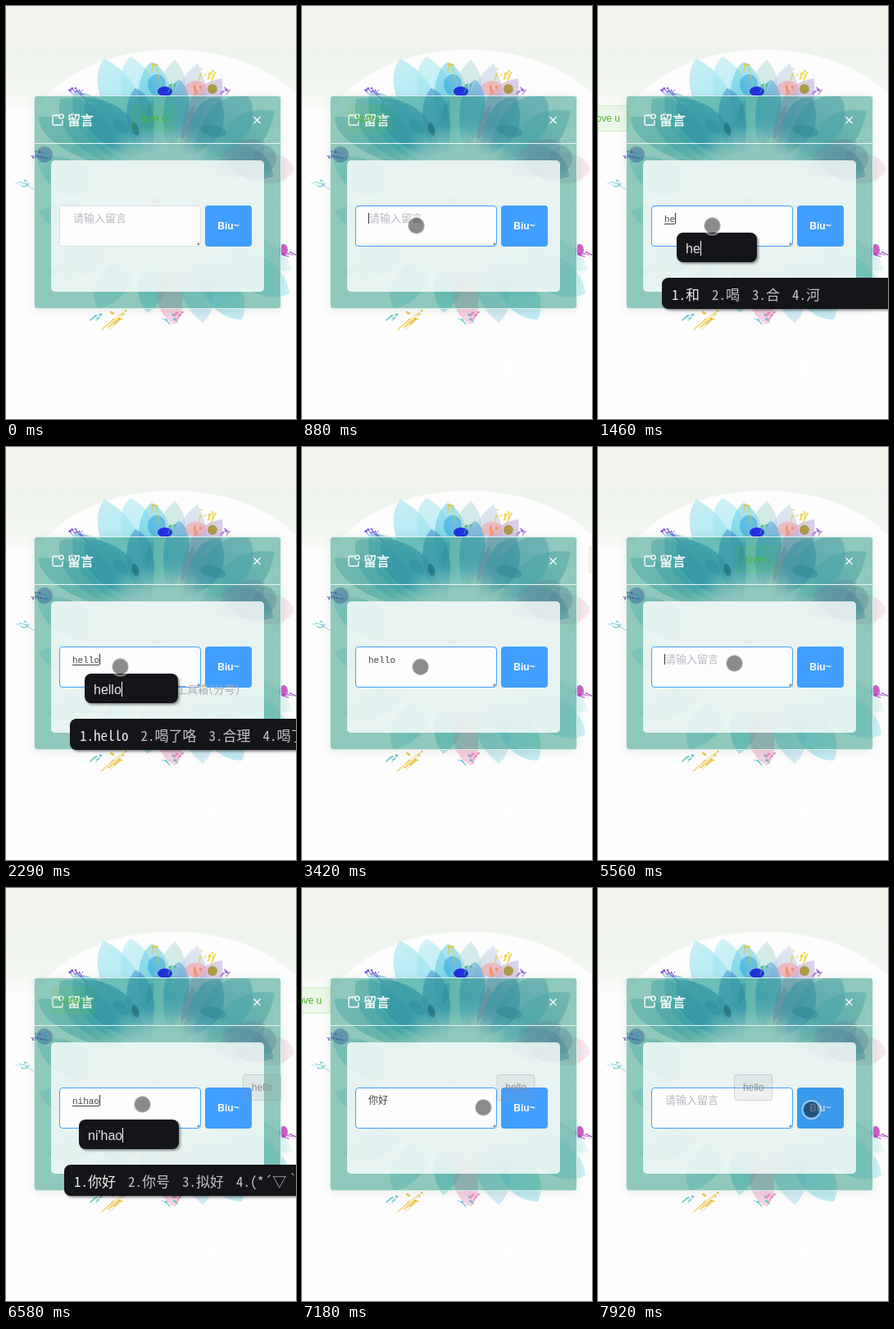
These frames come from a looping animation (354x503 px, 8 s). An HTML page with a canvas:

```html
<!DOCTYPE html>
<html lang="zh">
<head>
<meta charset="utf-8">
<title>留言</title>
<style>
  html, body { margin: 0; width: 100%; height: 100%; overflow: hidden; background: #fcfdfc; }
  #stage { position: relative; width: 354px; height: 503px; overflow: hidden;
    font: 12px "Liberation Sans", Arial, "Noto Sans CJK SC", sans-serif; }
  #stage * { box-sizing: border-box; }
  #stage > *, .dialog > * { position: absolute; }
  .dialog { left: 34px; top: 109px; width: 302px; height: 260px; border: 1px solid #dcefea;
    border-radius: 4px; background: rgba(36,147,127,.5); box-shadow: 0 2px 12px rgba(0,0,0,.08); }
  .rule { left: 0; right: 0; top: 57px; height: 1px; background: #e9f5f2; }
  .title { left: 40px; top: 19px; font-size: 16px; line-height: 22px; color: #fff; -webkit-text-stroke: .3px #fff; }
  .icons { left: 0; top: 0; fill: none; stroke: #fff; stroke-width: 1.4; }
  .panel { left: 20px; top: 78px; width: 260px; height: 160px; border-radius: 5px; background: rgba(255,255,255,.8); }
  .field { left: 65px; top: 243px; width: 173px; height: 50px; padding: 5px 15px; border: 1px solid #d9dee5;
    border-radius: 4px; background: #fdfdfd; color: #444; white-space: nowrap;
    font: 13px/21px "Liberation Mono", "Noto Sans CJK SC", monospace; }
  .field.focus { border-color: #409eff; }
  .field i { position: absolute; right: 1px; bottom: 1px; width: 4px; height: 4px;
    background: linear-gradient(135deg, transparent 55%, #888 55%); }
  #typed { font-size: 11px; }
  #typed.done { font-size: 12px; }
  #typed.composing { text-decoration: underline; text-underline-offset: 2px; }
  .caret { display: inline-block; width: 1px; height: 13px; margin-right: -1px; background: #333; vertical-align: -2px; }
  #hint { margin-left: 1px; color: #b5b9c0; font-weight: 300; }
  .send { left: 243px; top: 243px; width: 57px; height: 50px; border-radius: 4px; background: #409eff;
    color: #fff; font-weight: bold; line-height: 50px; text-align: center; }
  .send.down { background: #3a99e9; color: #b9d5ec; }

  .tag { left: -1px; height: 32px; padding: 0 10px; border: 1px solid; border-radius: 4px; line-height: 30px;
    white-space: nowrap; animation: drift 8s infinite; }
  .love { top: 121px; color: #4fb52a; background: rgba(103,194,58,.1); border-color: rgba(103,194,58,.22); }
  .hello { top: 227px; color: #8a8d92; background: rgba(144,147,153,.12); border-color: rgba(144,147,153,.32); }
  .a { animation-delay: -4.63s; }
  .b { animation: drift 8s -2.33s infinite, early 8s step-end infinite; }
  .c { animation: drift 8s -2.29s infinite, late 8s step-end infinite; }
  @keyframes drift {
    0% { transform: translateX(354px); animation-timing-function: cubic-bezier(.333,.222,.667,.556); }
    51.1%, 100% { transform: translateX(-54px); }
  }
  @keyframes early { 0% { visibility: visible; } 25%, 100% { visibility: hidden; } }
  @keyframes late { 0% { visibility: hidden; } 25%, 100% { visibility: visible; } }

  .ime { background: #141518; box-shadow: 2px 2px 3px rgba(0,0,0,.4); color: #c4c4c6; white-space: pre; }
  .reading { left: 96px; top: 276px; height: 36px; padding: 0 69px 0 11px; border-radius: 8px;
    font-size: 16px; line-height: 40px; color: #e4e4e6; }
  .reading .caret { height: 18px; background: #fff; vertical-align: -3px; }
  .picks { left: 78px; top: 331px; width: 330px; height: 38px; padding-left: 12px; border-radius: 8px; display: flex; gap: 15px;
    font: 17px/39px "Noto Sans Mono CJK SC", "Noto Sans CJK SC", monospace; }
  .picks span { flex: none; }
  .picks span:first-child { color: #eee; }
  .second { transform: translate(-7px, 6px); }
  .tip { left: 208px; top: 286px; font: 300 13px/18px "Noto Sans Mono CJK SC", "Noto Sans CJK SC", monospace; color: #a9adb0; }
  [hidden] { display: none !important; }

  .dot { left: -12px; top: -12px; width: 24px; height: 24px; border-radius: 50%; border: 2px solid rgba(255,255,255,.5);
    background: rgba(0,0,0,.45) padding-box; animation: touch 8s ease-in-out infinite, appear 8s step-end infinite; }
  @keyframes touch {
    0%, 3.5% { transform: translate(254px,440px); }
    9.3%, 41.5% { transform: translate(139.5px,267.5px); }
    50.5%, 54% { transform: translate(268.5px,274px); }
    64%, 84% { transform: translate(166.5px,263.5px); }
    94.5%, 100% { transform: translate(260.5px,270px); }
  }
  .spot { left: 244px; top: 431px; width: 20px; height: 20px; border-radius: 50%; background: #fff; animation: appear 8s step-end infinite; }
  @keyframes appear { 0% { opacity: 0; } .75%, 100% { opacity: 1; } }
</style>
</head>
<body>
<div id="stage">
  <canvas id="art" width="354" height="503"></canvas>
  <div class="spot"></div>
  <div class="dialog">
    <div class="rule"></div>
    <svg class="icons" width="300" height="57">
      <path d="M29 23H23.5Q22 23 22 24.500V33.500Q22 35 23.500 35H32.500Q34 35 34 33.500V29"/>
      <circle cx="32.500" cy="24.500" r="2.600"/>
      <path d="M267.500 25l8 8m0-8l-8 8"/>
    </svg>
    <div class="title">留言</div>
    <div class="panel"></div>
  </div>
  <div class="field" id="field"><span id="typed"></span><span class="caret" id="caret"></span><span id="hint">请输入留言</span><i></i></div>
  <div class="send" id="send">Biu~</div>
  <div class="tag love a">love u</div>
  <div class="tag love b">love u</div>
  <div class="tag hello c">hello</div>
  <div class="tip" id="tip" hidden>工具箱(分号)</div>
  <div class="ime reading" id="reading" hidden><span id="letters"></span><span class="caret"></span></div>
  <div class="ime picks" id="picks" hidden></div>
  <div class="dot"></div>
</div>
<script>
const $ = id => document.getElementById(id);

// Watercolour backdrop
const g = $('art').getContext('2d');
let seed = 11;
const rnd = () => (seed = seed * 16807 % 2147483647) / 2147483647;
const TAU = Math.PI * 2;

function oval(x, y, rx, ry, color, alpha = 1, turn = 0) {
  g.globalAlpha = alpha;
  g.fillStyle = color;
  g.beginPath();
  g.ellipse(x, y, rx, ry, turn, 0, TAU);
  g.fill();
}

// Uneven petal from a tip to its base, w wide on each side
function petal(tx, ty, bx, by, w, color, alpha) {
  const len = Math.hypot(tx - bx, ty - by);
  const ux = (bx - tx) / len, uy = (by - ty) / len;
  const wash = g.createLinearGradient(tx, ty, bx, by);
  wash.addColorStop(0, color + 'b0');
  wash.addColorStop(.5, color);
  wash.addColorStop(1, color + '00');
  const side = (along, out) => [tx + ux * len * along - uy * w * out, ty + uy * len * along + ux * w * out];
  g.globalAlpha = alpha;
  g.fillStyle = wash;
  g.beginPath();
  g.moveTo(tx, ty);
  g.bezierCurveTo(...side(.08 + rnd() * .1, .35 + rnd() * .4), ...side(.5, .5 + rnd() * .5), bx, by);
  g.bezierCurveTo(...side(.5, -.5 - rnd() * .5), ...side(.1 + rnd() * .15, -.3 - rnd() * .5), tx, ty);
  g.fill();
}

// Drops and thin flicks scattered round a point
function splash(x, y, spread, n, color, angle, reach = 10) {
  g.strokeStyle = color;
  g.lineCap = 'round';
  for (let i = 0; i < n; i++) {
    const px = x + (rnd() - .5) * spread * 2, py = y + (rnd() - .5) * spread;
    oval(px, py, .5 + rnd() * 1.5, .5 + rnd() * 1.1, color, .8);
    if (i % 2) continue;
    const a = angle + (rnd() - .5) * .4, l = reach * (.4 + rnd());
    g.lineWidth = .5 + rnd() * 1.2;
    g.beginPath();
    g.moveTo(px, py);
    g.lineTo(px + Math.cos(a) * l, py + Math.sin(a) * l);
    g.stroke();
  }
}

function paint() {
  g.fillStyle = '#fcfdfc';
  g.fillRect(0, 0, 354, 503);
  const sky = g.createLinearGradient(0, 0, 0, 130);
  sky.addColorStop(0, '#f1f4ec');
  sky.addColorStop(.385, '#f0f4ec');
  sky.addColorStop(.39, '#edf3ec');
  sky.addColorStop(.8, '#f2f6f0');
  sky.addColorStop(1, '#fcfdfc');
  g.fillStyle = sky;
  g.fillRect(0, 0, 354, 130);
  oval(203, 165, 176, 112, '#fcfdfc');

  const crown = [
    [40, 135, 150, 200, 40, '#86c4cc'], [66, 114, 150, 200, 48, '#6fb6cc'],
    [84, 104, 165, 200, 50, '#4fb4cf'], [120, 64, 180, 195, 46, '#8fe0ec'],
    [152, 62, 182, 190, 44, '#a2e6f0'], [178, 68, 190, 185, 38, '#62cbe0'],
    [206, 65, 195, 185, 38, '#b4dcd8'], [234, 70, 202, 185, 40, '#c2cfe6'],
    [264, 88, 212, 190, 44, '#bba6da'], [296, 110, 225, 195, 48, '#78acd6'],
    [328, 128, 232, 205, 46, '#7cbccc'], [98, 112, 172, 190, 44, '#3c96cc'],
    [158, 100, 176, 190, 36, '#3f8fd0'], [212, 90, 198, 180, 34, '#4aa2d4'],
    [262, 112, 215, 185, 36, '#4d94c6']
  ];
  const skirt = [
    [38, 186, 130, 235, 40, '#a4d8e0'], [40, 250, 125, 262, 36, '#bfe4e6'],
    [52, 325, 145, 280, 36, '#a9dce2'], [112, 368, 165, 285, 36, '#9adbe2'],
    [172, 374, 185, 290, 36, '#6fcfdc'], [206, 388, 200, 295, 34, '#f0a8c8'],
    [240, 386, 215, 290, 38, '#a8d6ea'], [288, 382, 228, 290, 46, '#8ad8ea'],
    [346, 350, 245, 285, 44, '#9ce2ee'], [350, 322, 250, 270, 34, '#d2eef4'],
    [352, 200, 262, 190, 38, '#f0cfe0'], [326, 208, 262, 172, 36, '#6488b8'],
    [316, 166, 248, 205, 40, '#a596c4']
  ];
  crown.forEach(p => petal(...p, .72));
  skirt.forEach(p => petal(...p, .7));
  oval(158, 150, 4, 8, '#1c4a78', .75, -.3);
  oval(140, 146, 12, 6, '#3a80b8', .4, .7);
  oval(176, 128, 4, 13, '#2f7fb0', .4, .2);
  oval(222, 142, 4, 22, '#9a78b8', .55, .35);
  oval(253, 152, 16, 7, '#2c6f9a', .4, .2);
  oval(316, 186, 14, 16, '#8a7cae', .4);
  oval(232, 100, 13, 9, '#eeb0b8', .8);
  oval(184, 96, 11, 13, '#2fa4dc', .55);

  const face = g.createRadialGradient(0, 0, 10, 0, 0, 92);
  face.addColorStop(0, '#fff');
  face.addColorStop(.65, '#ffffffcc');
  face.addColorStop(1, '#ffffff00');
  g.globalAlpha = .85;
  g.fillStyle = face;
  g.save();
  g.translate(185, 246);
  g.scale(1, 1.08);
  g.fillRect(-92, -92, 184, 184);
  g.restore();
  oval(184, 237, 6, 3, '#d98a96', .6);

  oval(194, 104, 9, 6, '#1820e0', .9);
  oval(252, 101, 6, 6, '#a8922a', .85);
  oval(47, 181, 10, 10, '#6a5cc0', .6);
  oval(339, 297, 5, 7, '#c03ac0', .8);
  splash(86, 100, 8, 8, '#7650dc', 1.1, 11);
  splash(36, 181, 7, 9, '#5a3fc4', .2, 8);
  splash(182, 72, 3, 5, '#d8c83c', 1.5, 17);
  splash(246, 80, 10, 10, '#ecca1e', 1.9, 8);
  splash(203, 95, 4, 4, '#3fae70', 2, 14);
  splash(233, 97, 6, 6, '#ef8a48', 1.3, 8);
  splash(268, 102, 6, 6, '#9a58d0', 2.2, 8);
  splash(20, 216, 8, 8, '#7ccdd8', .4, 9);
  splash(116, 378, 9, 6, '#5cc0c8', 2.3, 12);
  splash(136, 377, 12, 11, '#eab41e', 2.4, 15);
  splash(196, 380, 10, 6, '#58bcd4', .8, 6);
  splash(210, 376, 9, 6, '#ec7fb6', 2.2, 6);
  splash(342, 302, 5, 5, '#a848c8', .4, 6);
}
paint();

// [time, field text, reading, candidates]
const keys = [
  [0, ''],
  [1240, 'h', 'h', '好 和 会 还'],
  [1400, 'he', 'he', '和 喝 合 河'],
  [1600, 'hel', 'hel', '合理 和了 喝了 何乐'],
  [1760, 'hell', 'hell', '合理 喝了 和了 何乐'],
  [1900, 'hello', 'hello', 'hello 喝了咯 合理 喝了'],
  [2500, 'hello'],
  [4160, ''],
  [5950, 'n', 'n', '你 那 年 呢'],
  [6060, 'ni', 'ni', '你 呢 尼 拟'],
  [6200, 'nih', "ni'h", '你好 你会 你还 你号'],
  [6330, 'niha', "ni'ha", '你哈 你好 拟好 你号'],
  [6450, 'nihao', "ni'hao", '你好 你号 拟好 (*´▽｀*)'],
  [6650, '你好'],
  [7840, '']
];
const within = (t, a, b) => t >= a && t < b;
let current;

function type(key) {
  const [at, text, reading, words] = key;
  $('typed').textContent = text;
  $('typed').className = reading ? 'composing' : /[a-z]/.test(text) ? '' : 'done';
  $('hint').hidden = !!text;
  $('letters').textContent = reading || '';
  $('picks').replaceChildren(...(words || '').split(' ').map((word, i) => {
    const item = document.createElement('span');
    item.textContent = `${i + 1}.${word}`;
    return item;
  }));
  for (const id of ['reading', 'picks']) {
    $(id).hidden = !reading;
    $(id).classList.toggle('second', at > 5000);
  }
}

let start;
function frame(now) {
  start ??= now;
  const t = (now - start) % 8000;
  const key = keys.findLast(k => k[0] <= t);
  if (key !== current) type(current = key);
  const since = within(t, 760, 4160) ? t - 760 : t - 5200;
  $('field').classList.toggle('focus', since >= 0);
  const lit = since >= 0 && (key[2] || since % 1060 < 530);
  $('caret').style.visibility = lit ? 'visible' : 'hidden';
  $('tip').hidden = !within(t, 2285, 2430);
  $('send').classList.toggle('down', within(t, 4150, 4420) || t >= 7800);
  requestAnimationFrame(frame);
}
requestAnimationFrame(frame);
</script>
</body>
</html>
```
